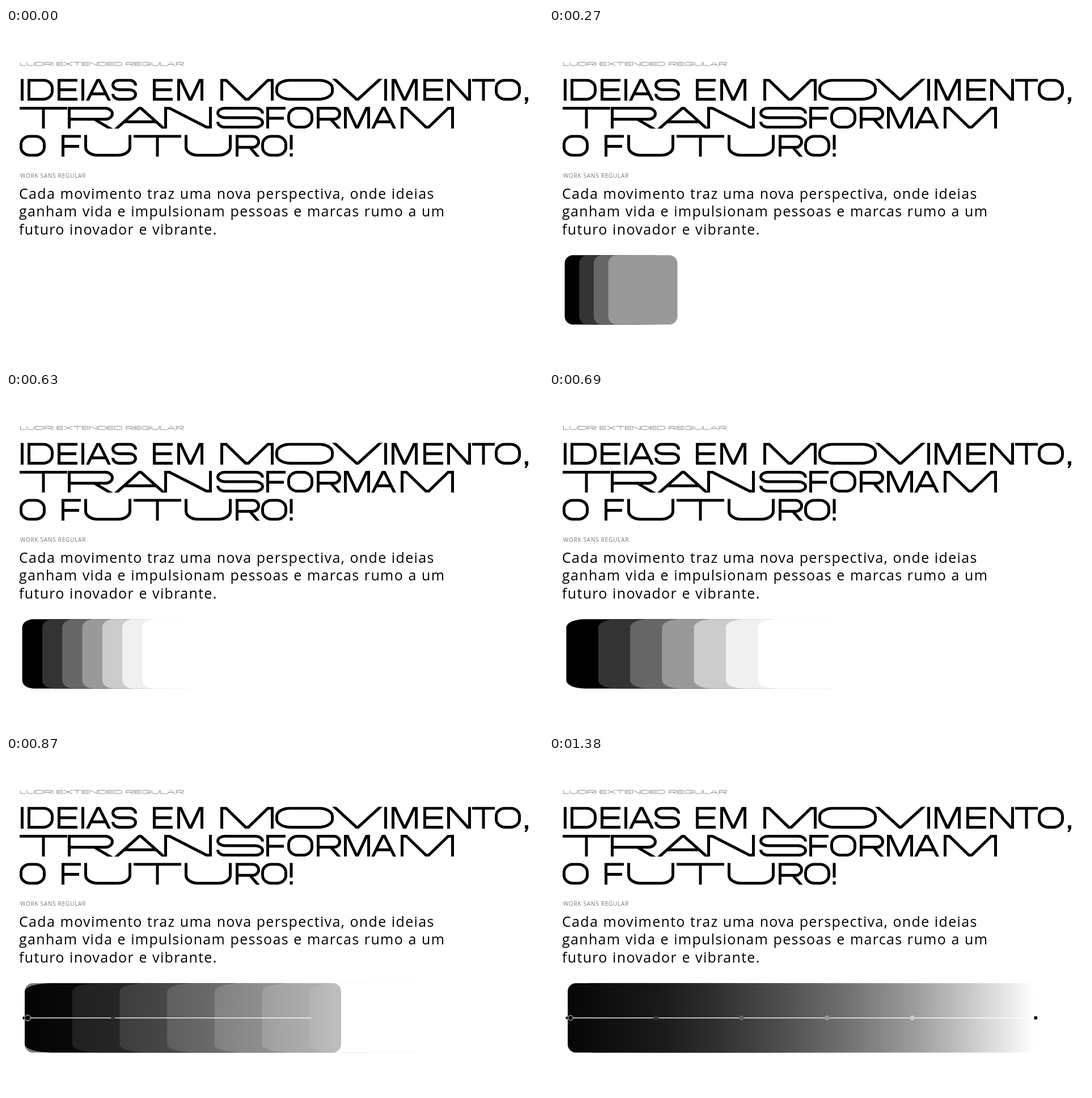
An HTML page for the animation above (1.8 s loop, 947 by 592 pixels).

```html
<!DOCTYPE html>
<html lang="pt">
<head>
<meta charset="utf-8">
<title>Ideias em movimento</title>
<style>
  html, body { margin: 0; width: 100%; height: 100%; overflow: hidden; background: #fff; }
  #stage { display: block; width: 947px; height: 592px; }
  text { font-family: "Open Sans", "Noto Sans", sans-serif; }
  .note { font-size: 10px; letter-spacing: .75px; fill: #777; }
  .body { font-size: 25px; letter-spacing: 1.33px; word-spacing: .5px; fill: #000; }
  .type path { fill: none; stroke: currentColor; stroke-width: 5; }
</style>
</head>
<body>
<svg id="stage" viewBox="0 0 947 592">
  <defs>
    <linearGradient id="ramp" gradientUnits="userSpaceOnUse" x1="33" x2="857">
      <stop offset="0" stop-color="#060606"/>
      <stop offset=".2" stop-color="#1a1a1a"/>
      <stop offset=".3" stop-color="#2c2c2c"/>
      <stop offset=".45" stop-color="#4c4c4c"/>
      <stop offset=".62" stop-color="#777"/>
      <stop offset=".75" stop-color="#9f9f9f"/>
      <stop offset=".87" stop-color="#ccc"/>
      <stop offset="1" stop-color="#fff"/>
    </linearGradient>
  </defs>
  <g id="label" class="type" color="#777" transform="translate(25 60) scale(.17)"
     role="img" aria-label="LUDRI EXTENDED REGULAR"></g>
  <g id="title" class="type" color="#000"
     role="img" aria-label="IDEIAS EM MOVIMENTO, TRANSFORMAM O FUTURO!"></g>
  <text class="note" x="25" y="264">WORK SANS REGULAR</text>
  <text class="body">
    <tspan x="23" y="300.5">Cada movimento traz uma nova perspectiva, onde ideias</tspan>
    <tspan x="23" y="332">ganham vida e impulsionam pessoas e marcas rumo a um</tspan>
    <tspan x="23" y="363.5">futuro inovador e vibrante.</tspan>
  </text>
  <g id="cards"></g>
  <rect id="bar" x="33" y="400.3" height="122.1" rx="14.5" fill="url(#ramp)"/>
  <rect id="line" x="32" y="460.8" height="1.4" fill="#fff"/>
  <g id="dots"></g>
</svg>
<script>
const $ = id => document.getElementById(id);
const add = (parent, tag, attrs) => {
  const node = document.createElementNS('http://www.w3.org/2000/svg', tag);
  for (const key in attrs) node.setAttribute(key, attrs[key]);
  return parent.appendChild(node);
};

// Monoline display letters: cap height H, stroke centres at T, M and B
const H = 38.5, T = 2.5, M = 19.25, B = 36, C = 14;

const arc = (rx, ry, sweep, dx, dy) => `a${rx} ${ry} 0 0 ${sweep} ${dx} ${dy}`;

const slant = w => (w / 2 - 4) / 36;

const tent = (x, w, foot, tip) => {
  const c = x + w / 2, m = slant(w), a = x + 2.5 * Math.hypot(1, m);
  const y = foot + 6 * Math.sign(foot - tip);
  return `M${a - 6 * m} ${y}L${c - 1.5} ${tip}H${c + 1.5}L${2 * c - a + 6 * m} ${y}`;
};

const shapes = {
  I: ({l}) => `M${l} 0V${H}`,
  L: ({l, e}) => `M${l} 0V${B}H${e}`,
  E: ({l, e}) => `M${e} ${T}H${l}V${B}H${e}M${l} ${M}H${e - 2}`,
  F: ({l, e}) => `M${e} ${T}H${l}V${H}M${l} ${M + 1}H${e - 3}`,
  T: ({x, c, e}) => `M${x} ${T}H${e}M${c} ${T}V${H}`,
  U: ({l, r, k}) => `M${l} 0V${B - C}${arc(k, C, 0, k, C)}H${r - k}${arc(k, C, 0, k, -C)}V0`,
  D: ({l, r, k}) => `M${l} ${T}H${r - k}${arc(k, C, 1, k, C)}V${B - C}${arc(k, C, 1, -k, C)}H${l}Z`,
  O: ({l, r, k}) => `M${l + k} ${T}H${r - k}${arc(k, C, 1, k, C)}V${B - C}${arc(k, C, 1, -k, C)}` +
    `H${l + k}${arc(k, C, 1, -k, -C)}V${T + C}${arc(k, C, 1, k, -C)}Z`,
  G: ({l, r, k, c}) => `M${r} ${T + C - 4}${arc(k, C - 4, 0, -k, 4 - C)}H${l + k}${arc(k, C, 0, -k, C)}` +
    `V${B - C}${arc(k, C, 0, k, C)}H${r - k}${arc(k, C, 0, k, -C)}V${M + 2}H${c}`,
  S: ({l, r, q}) => `M${r} 12${arc(q, 9.5, 0, -q, -9.5)}H${l + q}${arc(q, 8.375, 0, 0, 16.75)}` +
    `H${r - q}${arc(q, 8.375, 1, 0, 16.75)}H${l + q}${arc(q, 9.5, 1, -q, -9.5)}`,
  R: ({l, r, q, e, w}) => `M${l} ${H}V${T}H${r - q}${arc(q, 9.75, 1, 0, 19.5)}H${l}` +
    `M${e - .42 * w} 22L${e - 1} ${H + 3}`,
  M: ({l, r, c, g}) => `M${l} ${H}V${T}H${l + g}L${c - g / 3} ${B}H${c + g / 3}L${r - g} ${T}H${r}V${H}`,
  N: ({l, r, g}) => `M${l} ${H}V${T}H${l + g}L${r - g} ${B}H${r}V0`,
  X: ({l, r}) => `M${l} 0L${r} ${H}M${r} 0L${l} ${H}`,
  V: ({x, w}) => tent(x, w, 0, B),
  A: ({x, w, e}) => {
    const m = slant(w), inset = 2.5 * Math.hypot(1, m) + 12 * m;
    return tent(x, w, H, T) + `M${x + inset} 26.5H${e - inset}`;
  },
  '!': ({c}) => `M${c} 0V26M${c} 32.5V${H}`
};

// Capitals are the normal cut, small letters the expanded one
const widths = {
  I: 5, D: 46, E: 35, A: 44, S: 45, M: 46, O: 46, N: 42, T: 40, F: 34, R: 43, '!': 6,
  i: 5, l: 60, e: 68, x: 90, t: 84, u: 83, d: 85, o: 103, g: 95, s: 84, r: 81, m: 94, n: 84, v: 89, a: 91
};

const glyph = (parent, ch, x) => {
  const w = widths[ch], l = x + 2.5, e = x + w, r = e - 2.5;
  const box = {x, w, l, r, e, c: x + w / 2, k: 9 + .15 * w, q: 8 + .06 * w, g: .08 * w};
  add(parent, 'path', {d: shapes[ch.toUpperCase()](box)});
};

const titleLines = [
  ['IDEIASEMmovIMENTO', [26, 38, 91, 133, 141, 186, 259, 302, 378, 475, 575, 667, 680, 736, 778, 822, 862]],
  ['transFORMAm', [24, 109, 191, 279, 371, 459, 496, 548, 596, 644, 696]],
  ['OFutuRO!', [24, 98, 138, 225, 315, 405, 450, 500]]
];
titleLines.forEach(([text, lefts], row) => {
  const line = add($('title'), 'svg', {x: 0, y: 89.4 + 49.4 * row, width: 947, height: H});
  [...text].forEach((ch, i) => glyph(line, ch, lefts[i]));
});
add($('title'), 'path', {d: 'M915 122h6v6l-3.5 6h-3l2.5-6h-2z', style: 'fill:#000;stroke:none'});

let pen = 0;
for (const ch of 'ludri extended regular') {
  if (ch === ' ') { pen += 30; continue; }
  glyph($('label'), ch, pen);
  pen += widths[ch] + 7;
}

// Palette cards, gradient bar and its handles
const cards = ['#000', '#333', '#666', '#999', '#ccc', '#f0f0f0', '#fff'].map((fill, i) =>
  add($('cards'), 'rect', {x: 25.6 * i, y: 400.3, width: 122, height: 122.1, rx: 14.5, fill}));

const dots = ['#000', '#333', '#666', '#999', '#ccc'].map((fill, i) =>
  ({start: 775 + 65 * i, size: 4.4, node: add($('dots'), 'circle', {cx: 38 + 150.7 * i, cy: 461.5, fill})}));
dots[0].node.setAttribute('stroke', '#fff');
dots[0].node.setAttribute('stroke-width', .9);
const cap = add($('dots'), 'circle', {cx: 32, cy: 461.5, fill: '#000', stroke: '#fff', 'stroke-width': .6});
$('dots').prepend(cap);
dots.push({start: 710, size: 2.8, node: cap});
const end = add($('dots'), 'rect', {fill: '#000'});

const LOOP = 1800, TICK = 30;
const part = (t, start, length) => Math.min(1, Math.max(0, (t - start) / length));
const easeOut = u => Math.sin(u * Math.PI / 2);
const pop = u => u < .42
  ? 1.18 * easeOut(u / .42) ** .6
  : 1.09 + .09 * Math.cos((u - .42) / .58 * Math.PI);
const show = (node, on) => node.setAttribute('visibility', on ? 'visible' : 'hidden');

function draw(t) {
  cards.forEach((card, i) => show(card, t >= Math.max(30, 90 * i)));
  const p = easeOut(part(t, 600, 238)) ** 1.1;
  $('cards').setAttribute('transform', `translate(${27.7 + 5.3 * p} 0) scale(${1 + 2.27 * p} 1)`);

  $('bar').setAttribute('width', 827 * easeOut(part(t, 672, 420)));
  $('bar').setAttribute('opacity', part(t, 685, 340));
  $('line').setAttribute('width', 823 * easeOut(part(t, 692, 422)));

  for (const {start, size, node} of dots) {
    const u = part(t, start, 215);
    show(node, u > 0);
    node.setAttribute('r', size * pop(u));
  }
  const side = 5.5 * pop(part(t, 1165, 215));
  show(end, side > 0);
  end.setAttribute('x', 858.3 - side / 2);
  end.setAttribute('y', 461.4 - side / 2);
  end.setAttribute('width', side);
  end.setAttribute('height', side);
}

const origin = performance.now();
function loop() {
  const t = (performance.now() - origin) % LOOP;
  draw(Math.floor(t / TICK) * TICK);
  requestAnimationFrame(loop);
}
loop();
</script>
</body>
</html>
```
